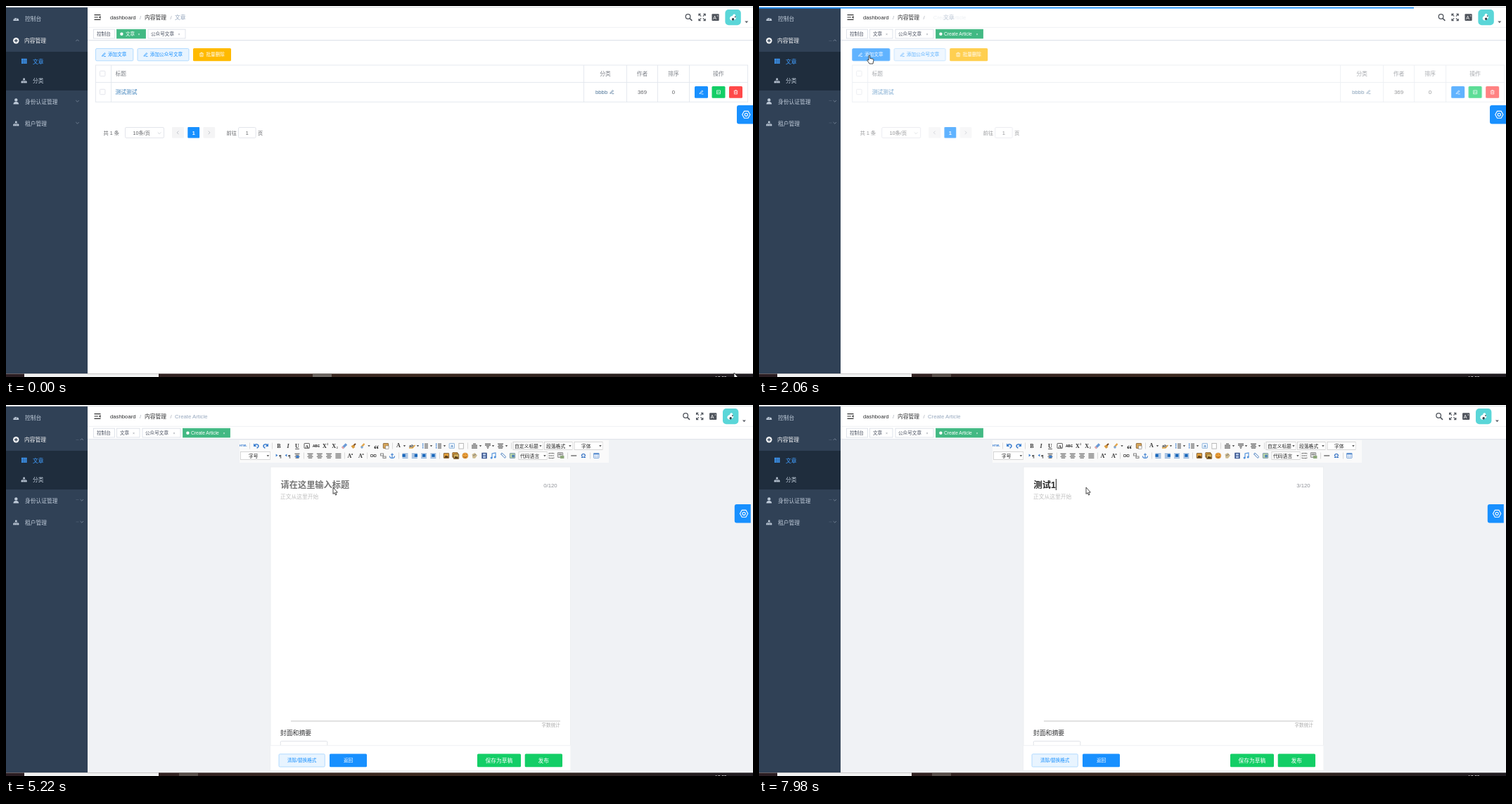
An HTML page that plays this animation: 1062 by 527 pixels, repeating every 8000 ms.

```html
<!DOCTYPE html>
<html lang="zh-CN">
<head>
<meta charset="utf-8">
<title>文章管理</title>
<style>
html, body { margin: 0; width: 100%; height: 100%; overflow: hidden; background: #fff; }
svg { display: block; width: 1062px; height: 527px; font-family: "Liberation Sans", "Noto Sans CJK SC", "Noto Sans CJK", sans-serif; }
text { white-space: pre; }
</style>
</head>
<body>
<svg id="stage" viewBox="0 0 1062 527"></svg>
<script>
const BLUE = '#1890ff', GREEN = '#13ce66', LOOP = 8000;
const LEAVE = 2006, ENTER = 2330, READY = 2550, FOCUS = 3600, COMPOSE = 5860, COMMIT = 6640, DIGIT = 7640;

// Drawing helpers; text is placed by its vertical centre.
const rect = (x, y, w, h, fill, more = '') => `<rect x="${x}" y="${y}" width="${w}" height="${h}" fill="${fill}" ${more}/>`;
const box = (x, y, w, h, fill, stroke, r = 1.5) => rect(x + .5, y + .5, w - 1, h - 1, fill, `stroke="${stroke}" stroke-width=".8" rx="${r}"`);
const text = (x, y, s, size = 7.75, fill = '#606266', more = '') =>
  `<text x="${x}" y="${y + size * .37}" font-size="${size}" fill="${fill}" ${more}>${s}</text>`;
const mid = (x, y, s, size, fill, more = '') => text(x, y, s, size, fill, 'text-anchor="middle" ' + more);
const line = (d, stroke, w = 1, more = '') => `<path d="${d}" fill="none" stroke="${stroke}" stroke-width="${w}" ${more}/>`;
const shape = (d, fill) => `<path d="${d}" fill="${fill}"/>`;
const dot = (x, y, r, fill, more = '') => `<circle cx="${x}" cy="${y}" r="${r}" fill="${fill}" ${more}/>`;
const at = (x, y, s) => `<g transform="translate(${x} ${y})">${s}</g>`;
const group = (id, s) => `<g id="${id}">${s}</g>`;
const chevron = (x, y, up, c = '#8795a8') => line(`M${x - 2.2} ${y + (up ? 1 : -1)}l2.2 ${up ? -2.2 : 2.2}l2.2 ${up ? 2.2 : -2.2}`, c, .7);

const pencil = (x, y, c) => at(x, y, line('M-2.2 1.4L1.2-2.4L2.3-1.4L-1 2L-2.5 2.3ZM0 2.6H3', c, .75));
const trash = (x, y, c) => at(x, y, line('M-2.8-1.7H2.8M-1-1.9V-2.8H1V-1.9M-2.1-1.5V2.7H2.1V-1.5M-.7-.2V1.6M.7-.2V1.6', c, .7));
const picture = (x, y, c) => at(x, y, line('M-2.5-2.5H2.5V2.5H-2.5ZM-2.3 1.6L-.6 0L.6 1L2.3-.4M-1.2-1.2H0', c, .65));
const tree = (x, y, c) => at(x, y, rect(-1.2, -3.4, 2.4, 2.4, c) + [-4, -1.2, 1.6].map(i => rect(i, 1, 2.4, 2.4, c)).join('') + line('M-2.8 1V0H2.8V1M0-1V1', c, .6));

function sidebar() {
  const c = '#bfcbd9';
  return rect(0, 2, 116, 520, '#304156') + rect(0, 65, 116, 55, '#1f2d3d') +
    at(14.3, 18, shape('M-4 3A4 4 0 1 1 4 3Z', c) + line('M0 1.8L1.6-1.4M-2.6 .6h1M-1.8-1.6l.6.6', '#304156', .8)) +
    text(27, 18, '控制台', 7.75, c) +
    dot(14.3, 49.3, 4.2, '#fff') + line('M14.3 46.8v5M11.8 49.3h5', '#304156', 1.3) +
    text(26, 49, '内容管理', 7.75, '#f4f4f5', 'font-weight="500"') +
    rect(22, 74.8, 7.6, 7, '#409eff') + line('M22 77.2h7.6M22 79.5h7.6M24.6 75v7M27.1 75v7', '#1f2d3d', .4) +
    text(38, 79, '文章', 7.75, '#409eff') +
    tree(25.6, 106, c) + text(38, 106, '分类', 7.75, c) +
    dot(14.3, 133.4, 2.2, c) + shape('M10.4 139.4c0-4.6 7.8-4.6 7.8 0Z', c) + text(27, 136, '身份认证管理', 7.75, c) +
    tree(14.3, 167, c) + text(27, 167, '租户管理', 7.75, c) +
    group('arrows', chevron(101.5, 49, true) + chevron(101.5, 135, false) + chevron(101.5, 166, false)) +
    group('remnant', line('M99.5 49.5h4M99.5 134.5h4M99.5 166h4', '#56657a', .6));
}

function tab(x, w, label, active, tx, close) {
  return box(x, 32.7, w, 13.8, active ? '#42b983' : '#fff', active ? '#42b983' : '#d8dce5', 0) +
    (active ? dot(x + 7.4, 39.8, 2.2, '#fff') : '') +
    text(tx, 39.7, label, 6.64, active ? '#fff' : '#495060') +
    (close ? mid(close, 39.7, '×', 5.2, active ? '#fff' : '#8a9099') : '');
}

function header() {
  const ink = '#4f545c';
  return rect(116, 2, 946, 46.5, '#fff') + line('M116 30.4H1062', '#eceef2', .8) + line('M116 48.8H1062', '#d8dce5', 1) +
    line('M125.5 12.6h9M125.5 16h5.4M125.5 19.4h9', '#333', 1.1) + shape('M134.5 14v4l-2.6-2Z', '#333') +
    text(148, 16, 'dashboard', 7.75, '#303133') + text(190, 16, '/', 7.75, '#a4a9b3') +
    text(197, 16, '内容管理', 7.75, '#303133') + text(233.5, 16, '/', 7.75, '#a4a9b3') +
    group('crumbOld', text(240, 16, '文章', 7.75, '#97a8be')) +
    group('crumbNew', text(240, 16, 'Create Article', 7.75, '#97a8be')) +
    tab(124, 31, '控制台', false, 129) +
    group('tabsOld', tab(157, 42, '文章', true, 170, 189) + tab(201.5, 54, '公众号文章', false, 206, 246)) +
    group('tabsNew', tab(157, 33.5, '文章', false, 162, 181.5) + tab(193.5, 55, '公众号文章', false, 198, 239) + tab(251, 68, 'Create Article', true, 263, 310)) +
    group('tools',
      dot(969.6, 15, 3.3, 'none', `stroke="${ink}" stroke-width="1.3"`) + line('M972 17.5l3.4 3.4', ink, 1.6) +
      line('M985 14V11.3H987.7M991.5 11.3H994.2V14M994.2 18V20.7H991.5M987.7 20.7H985V18M985.5 11.8l2.8 2.8M993.7 11.8l-2.8 2.8M985.5 20.2l2.8-2.8M993.7 20.2l-2.8-2.8', ink, 1.2) +
      rect(1003.5, 11.2, 10.2, 9.8, ink, 'rx="1"') + mid(1007.5, 16.4, 'A', 7, '#fff') + mid(1011.8, 14, 'x', 3.8, '#fff') +
      rect(1022.4, 5, 22.4, 22.2, '#5ad6d8', 'rx="5"') +
      group('avatar', '<ellipse rx="4.6" ry="3.2" fill="#fff"/>' + dot(2.8, -2.6, 2, '#fff') + dot(-.5, 1.8, 1.7, '#2e3f48') + dot(3.6, -.3, .9, '#2e3f48')) +
      shape('M1050.3 21.4h5l-2.5 2.8Z', '#5a5e66'));
}

function button(x, w, label, tx, ix, filled) {
  const c = filled ? '#fff' : BLUE;
  return box(x, 60, w, 18.3, filled ? BLUE : '#e8f4ff', filled ? BLUE : '#a3d3ff') + pencil(ix, 69, c) + text(tx, 69, label, 6.64, c);
}

function listPage() {
  const grey = '#909399', cols = [[852, '分类'], [904.5, '作者'], [949, '排序'], [1013, '操作']];
  const ops = [[979, BLUE, pencil], [1003.5, GREEN, picture], [1028, '#ff4949', trash]];
  return group('add', button(127, 54.3, '添加文章', 145, 139, false)) + group('addOn', button(127, 54.3, '添加文章', 145, 139, true)) +
    group('pub', button(186.5, 74, '添加公众号文章', 204.8, 198.5, false)) + group('pubOn', button(186.5, 74, '添加公众号文章', 204.8, 198.5, true)) +
    rect(266, 60, 54, 18.3, '#ffba00', 'rx="1.5"') + trash(278, 69, '#fff') + text(284.5, 69, '批量删除', 6.64, '#fff') +
    line('M127.5 84V136.5M149.5 84V136.5M821.5 84V136.5M882.5 84V136.5M926.5 84V136.5M971.5 84V136.5M1054.5 84V136.5M127 84H1055M127 108.5H1055M127 136.3H1055', '#e2e7ee', .9) +
    [96, 122].map(y => box(133, y - 4.2, 8.4, 8.4, '#fff', '#dcdfe6', 1)).join('') +
    text(155.5, 96, '标题', 7.75, '#7d8188') + cols.map(([x, s]) => mid(x, 96, s, 7.75, '#7d8188')).join('') +
    text(155.5, 122, '测试测试', 7.75, '#337ab7') + text(838, 122, 'bbbb', 7.75, '#4c7397') + pencil(861.3, 122, '#4c7397') +
    mid(904.5, 122, '369', 7.75) + mid(949, 122, '0', 7.75) +
    ops.map(([x, c, icon]) => rect(x, 114, 19, 16.8, c, 'rx="1.5"') + icon(x + 9.5, 122.4, '#fff')).join('') +
    text(138.5, 180, '共 1 条', 7.2) + box(169, 172, 56, 15.8, '#fff', '#dcdfe6') + mid(192.7, 180, '10条/页', 7.2) + chevron(218, 180.5, false, '#c0c4cc') +
    rect(236, 172, 17, 15.6, '#f4f4f5', 'rx="1"') + line('M245.4 177.6l-2.2 2.3l2.2 2.3', '#b4b8c0', .8) +
    rect(258.3, 172, 16.8, 15.6, BLUE, 'rx="1"') + mid(266.7, 180, '1', 7.2, '#fff', 'font-weight="bold"') +
    rect(280.4, 172, 16.8, 15.6, '#f4f4f5', 'rx="1"') + line('M287.7 177.6l2.2 2.3l-2.2 2.3', '#b4b8c0', .8) +
    text(313.5, 180, '前往', 7.2) + box(330, 172, 25.6, 15.8, '#fff', '#dcdfe6') + mid(342.8, 180, '1', 7.2) + text(358, 180, '页', 7.2);
}

function toolbar() {
  const ink = '#333', steel = '#3d7fd0', serif = 'font-family="Liberation Serif, serif" font-weight="bold"';
  const caret = (x, y = 58) => shape(`M${x - 1.7} ${y - .7}h3.4l-1.7 2Z`, ink);
  const letter = (x, y, s, size = 8, more = '') => mid(x, y, s, size, ink, serif + more);
  const bars = (x, y, ws, c = ink, dx = 0) => ws.map((w, i) => rect(x - w / 2 + dx, y - 3.3 + i * 2, w, 1, c)).join('');
  const seps = (y, xs) => xs.map(x => rect(x, y - 4.5, .7, 9, '#ccc')).join('');
  const select = (x, y, w, s, tx) => box(x, y - 6, w, 12, '#fff', '#ccc', 0) + text(tx, y, s, 6.8, '#222') + rect(x + w - 7, y - 5, 6.2, 10, '#fff') + caret(x + w - 3.6, y);
  const frame = (x, y, fill, c = '#777') => box(x - 4.2, y - 3.9, 8.4, 7.8, fill, c, .5);
  const undo = s => `<g transform="scale(${s} 1)">` + line('M-2.5-1C0-3.5 4-1.5 2.6 1.6L.6 3.4', steel, 1.5) + shape('M-4-3.4V1H.4Z', steel) + '</g>';
  const pic = (x, y, c) => frame(x, y, c, '#6a4b23') + shape(`M${x - 3} ${y + 2.8}l2.3-3.4l1.8 1.7l1-1l1 2.7Z`, '#4c3213');
  const wrap = (x, dx) => bars(x, 72, [8, 8, 8, 8], '#5d8fca') + rect(x - 2 + dx, 69.8, 4.2, 4, '#1767bb');
  return rect(332, 49.5, 525, 32.5, '#fafafa') +
    mid(337.2, 58, 'HTML', 4, steel, 'font-weight="bold"') + at(356, 58, undo(1)) + at(369, 58, undo(-1)) +
    letter(388, 58, 'B') + letter(401, 58, 'I', 8, ' font-style="italic"') + letter(414, 58, 'U', 8, ' text-decoration="underline"') +
    frame(427.7, 58, '#fff', ink) + letter(427.7, 58, 'A', 7) + mid(441, 58, 'ABC', 4.6, ink, 'font-weight="bold" text-decoration="line-through"') +
    letter(453, 58.5, 'X') + letter(457.3, 55.4, '2', 4) + letter(466.2, 58, 'X') + letter(470.8, 61, '2', 4) +
    line('M478.5 61l5.5-5.5', '#6b9bd6', 3.4) + line('M478 61.4l1.8-1.8', '#e9a5a5', 3) +
    line('M494 58l3-3', '#7a4a20', 2) + shape('M490.5 58.5l3-2l3 3l-3 2.6Z', '#d99b3e') +
    line('M505 60l4.5-5', '#e3a54a', 2.5) + dot(506, 60, 1.7, '#7aa6d8') + caret(516) +
    letter(526.5, 61.2, '“', 15) + frame(540, 58, '#d9a85c', '#7b5525') + rect(539.5, 58, 4.5, 4.3, '#fff', 'stroke="#666" stroke-width=".5"') +
    letter(558, 57.5, 'A') + caret(566.5) + mid(576.5, 57.5, 'ab', 6, ink, 'font-weight="bold"') + line('M573 61h5l3.6-4', '#e0a23d', 1.3) + caret(585.5) +
    [[596, 604.5], [615, 623.5]].map(([x, c]) => bars(x, 58, [5, 5, 5, 5], '#555', 1.5) + [0, 1, 2].map(i => dot(x - 3.3, 55.5 + i * 2.6, .9, steel)).join('') + caret(c)).join('') +
    frame(633.8, 58, '#eef5fd', '#79a7d7') + mid(633.8, 57.6, 'a', 6, '#286bb0') + box(643.4, 54, 7.4, 8.6, '#fff', '#aaa', 0) +
    [[666, 674.5], [685, 692.5], [703, 711.5]].map(([x, c], i) => bars(x, 58, [[4, 8, 8, 8], [8, 8, 4, 2], [8, 6, 8, 6]][i], '#444') + caret(c)).join('') +
    seps(58, [346, 378, 549, 656, 718]) + select(720.5, 58, 43, '自定义标题', 723) + select(765, 58, 40.5, '段落格式', 768) + select(807.5, 58, 41, '字体', 818) +
    select(333, 72, 43, '字号', 345) +
    [[388, 1], [401, -1]].map(([x, d]) => letter(x + 1.8, 72, '¶', 7) + shape(`M${x - 3 - d * 1.4} 69.5v4l${d * 2.8}-2Z`.replace(/v4l(-?[\d.]+)-2/, 'v4l$1-2'), steel)).join('') +
    bars(414, 72, [7, 5, 7, 5], '#555') + rect(412.5, 72, 4, 3, steel) +
    [-1, 0, 1, 0].map((d, i) => bars(432.5 + i * 13.3, 72, [8, i === 3 ? 8 : 5.5, 8, i === 3 ? 8 : 5.5], '#555')).join('') +
    letter(488.5, 72.5, 'A') + letter(492, 69.4, 'a', 5) + letter(504, 72.5, 'A') + letter(507.5, 69.4, 'a', 5) +
    line('M518.5 70.5h3v3h-3ZM523 70.5h3v3h-3ZM521 72h3', '#666', 1) + line('M532.5 69h4v3h-4ZM536 73h4v2.5h-4Z', '#888', 1.1) +
    line('M549 68.5v7M545.5 72.5c0 4 7 4 7 0M547 70.3h4', steel, 1.1) +
    [-2, 2, 0, 0].map((d, i) => wrap(567.5 + i * 13.3, d)).join('') +
    pic(626, 72, '#e4a13d') + pic(638.5, 71, '#e4a13d') + pic(640, 73, '#d3b15c') +
    dot(652.8, 72, 4, '#f0a33b', 'stroke="#b86e1c" stroke-width=".5"') + line('M650.5 73c1 1.8 3.6 1.8 4.6 0M651 70.6h.8M653.8 70.6h.8', '#6b3e0c', .8) +
    shape('M662.5 70l4-2l3.5 3.5l-3 4.3h-3.5Z', '#cdbb91') + line('M664 72l4-2', '#777', 1) +
    rect(676.3, 67.8, 7.4, 8.4, '#34508c') + rect(678, 69, 4, 2.6, '#b7cbe8') + rect(678, 72.6, 4, 2.6, '#b7cbe8') +
    line('M691 75v-6l5-1v6', '#4d8fdb', 1.1) + dot(690.2, 75, 1.5, '#4d8fdb') + dot(695.2, 74, 1.5, '#4d8fdb') +
    line('M704 70l4 4.5c2 1.5 3-.5 2-1.7l-4-4c-1.6-1.2-3 .5-1.8 2', '#4a7fc0', 1) +
    frame(720, 72, '#b9d5a7', '#6d8aa8') + dot(721, 72.6, 2, '#4d80b8') + select(728.5, 72, 41, '代码语言', 731) +
    line('M772 69.5v-1h7v1M772 74.5v1h7v-1M771.5 72h8', '#555', 1, 'stroke-dasharray="2 .6"') +
    frame(788, 71, '#ddd') + rect(788, 72, 5.4, 4, '#8da77a') + line('M785.5 70h5', '#555', 1) +
    rect(803.2, 71.5, 8, 1, ink) + mid(821, 72, 'Ω', 8.5, '#2c6cc0', 'font-weight="bold"') +
    frame(839.3, 72, '#fff', '#5b8fd0') + rect(835.4, 68.4, 7.8, 2, '#5b8fd0') + line('M835.5 73h7.6M838 70v6M840.7 70v6', '#8fb4e3', .6) +
    seps(72, [423, 481, 513, 558, 616, 798, 830]);
}

function editorPage() {
  const green = (x, w, s) => rect(x, 495.5, w, 18.8, GREEN, 'rx="1.5"') + mid(x + w / 2, 505, s, 7.75, '#fff', 'font-weight="500"');
  return rect(116, 49.3, 946, 472.7, '#f0f2f5') + group('bar', toolbar()) +
    group('card', box(375.5, 87.5, 427.5, 432, '#fff', '#e9ebee', 0) +
      line('M405 449H788', '#c4c4c4', 1) + text(788, 455, '字数统计', 6.64, '#aaa', 'text-anchor="end"') +
      text(389.8, 466, '封面和摘要', 8.9, '#303133') + box(389.8, 477, 67.5, 20, '#fff', '#d9dce2') +
      rect(376, 483.5, 426.5, 35.5, '#fff') + line('M376 483.7H802.5', '#ebedf0', .8) +
      box(387.5, 495.3, 66.3, 19.2, '#e8f4ff', '#a3d3ff') + mid(420.7, 505, '清除/替换格式', 6.64, BLUE) +
      rect(460, 495.5, 53, 18.8, BLUE, 'rx="1.5"') + mid(486.5, 505, '返回', 6.64, '#fff') +
      green(670, 62, '保存为草稿') + green(737.7, 53.3, '发布') +
      '<text id="title" x="390.6" y="117.5" font-size="12.2" font-weight="bold"></text>' +
      text(390, 130, '正文从这里开始', 7.75, '#bfbfbf') +
      '<text id="count" x="783.6" y="117" font-size="7.75" fill="#909399" text-anchor="end"></text>' +
      group('popup', box(391, 122, 120, 24, '#fff', '#c8c8c8', 0) + text(397, 134, '1 测试   2 侧视   3 测', 7.75, '#333')) +
      group('underline', rect(0, 118.8, 1, .8, '#222')) + rect(0, 105, 1, 16, '#222', 'id="caret"'));
}

const hexagon = 'M-5.6 0L-2.8-4.9H2.8L5.6 0L2.8 4.9H-2.8Z';
document.getElementById('stage').innerHTML =
  '<defs><linearGradient id="task"><stop stop-color="#2a1d22"/><stop offset=".55" stop-color="#3d2a20"/><stop offset="1" stop-color="#1f1b20"/></linearGradient></defs>' +
  rect(0, 0, 1062, 527, '#fff') + group('list', listPage()) + group('editor', editorPage()) + header() + sidebar() +
  group('settings', shape('M1062 141H1042a3 3 0 0 0-3 3v20.5a3 3 0 0 0 3 3H1062Z', BLUE) + at(1052.3, 154.3, line(hexagon, '#fff', 1.1) + dot(0, 0, 2.1, 'none', 'stroke="#fff" stroke-width="1.1"'))) +
  rect(0, 0, 1062, 1.2, '#fff') + rect(0, 1.2, 1062, .9, '#d3d6da') + rect(0, 1.8, 0, 1.7, BLUE, 'id="progress"') +
  rect(0, 522.3, 1062, 4.7, 'url(#task)') + rect(26, 522.3, 191, 4.7, '#f1f2f2') + rect(0, 522.3, 27, 4.7, '#6d6762', 'id="task-on"') +
  text(1008, 528.4, '17:22', 6.6, '#fff') +
  group('arrow', '<path d="M0 0V9.4L2.1 7.6L3.5 11L5 10.3L3.6 7.1H6.3Z" fill="#fff" stroke="#111" stroke-width=".75"/>') +
  group('hand', '<path d="M-1 1C-1-.3.8-.3.8 1V4.4L5 5.3C6 5.6 6 6.4 5.8 7.6L5 12H0L-3.2 7.2C-3 6-1.8 6.2-1 7.2Z" fill="#fff" stroke="#111" stroke-width=".75"/>');

const el = {};
document.querySelectorAll('[id]').forEach(e => el[e.id] = e);
const show = (id, on) => el[id].setAttribute('display', on ? 'inline' : 'none');
const set = (id, attrs) => Object.entries(attrs).forEach(([k, v]) => el[id].setAttribute(k, v));
const move = (id, x, y = 0) => set(id, { transform: `translate(${x} ${y})` });
const ramp = (t, from, span) => Math.min(1, Math.max(0, (t - from) / span));
const ease = p => 1 - (1 - p) ** 2;
const smooth = p => p * p * (3 - 2 * p);
const within = (t, a, b) => t >= a && t < b;

// Pointer stops: time, x, y
const stops = [[0, 1035, 521], [220, 880, 430], [500, 420, 235], [780, 182, 126], [900, 178, 118], [1220, 204, 77], [1390, 192, 71],
  [1460, 180, 71], [1600, 157, 70], [2480, 157, 70], [2560, 161, 72], [2640, 161, 72], [2950, 310, 108], [3300, 455, 126], [3560, 465, 117]];
function pointer(t) {
  const i = stops.findIndex(s => s[0] > t);
  if (i < 0) return stops[stops.length - 1].slice(1);
  const [a, b] = [stops[i - 1], stops[i]], p = smooth((t - a[0]) / (b[0] - a[0]));
  return [a[1] + (b[1] - a[1]) * p, a[2] + (b[2] - a[2]) * p];
}

function typing(t) {
  const composing = within(t, COMPOSE, COMMIT), pinyin = "ce'shi".slice(0, 1 + Math.floor((t - COMPOSE) / 95));
  const typed = t >= DIGIT ? '测试1' : t >= COMMIT ? '测试' : composing ? pinyin : '';
  el.title.textContent = typed || '请在这里输入标题';
  set('title', { fill: typed ? '#222' : '#757575' });
  el.count.textContent = t < FOCUS ? '' : (t >= DIGIT ? 3 : t >= COMMIT ? 2 : 0) + '/120';
  const width = typed ? el.title.getComputedTextLength() : 0;
  const since = t - (t >= DIGIT ? DIGIT : t >= COMMIT ? COMMIT : FOCUS);
  set('caret', { x: 390.7 + width });
  show('caret', t >= FOCUS && (composing || Math.floor(since / 530) % 2 === 0));
  show('popup', composing);
  show('underline', composing);
  set('underline', { transform: `translate(390.6 0) scale(${width || 1} 1)` });
}

function draw(t) {
  const routed = t >= LEAVE, ready = t >= READY, out = ease(ramp(t, LEAVE, 324)), enter = ease(ramp(t, ENTER, 150));
  show('list', t < ENTER);
  set('list', { opacity: 1 - out });
  move('list', 16.6 * out);
  show('editor', t >= ENTER);
  set('editor', { opacity: enter });
  move('card', ready ? 0 : 1.7 - 16.6 * (1 - enter));
  show('bar', ready);

  const pubHover = within(t, 1210, 1500), addHover = t >= 1500;
  show('pub', !pubHover); show('pubOn', pubHover);
  show('add', !addHover); show('addOn', addHover);
  show('tabsOld', !routed); show('tabsNew', routed);
  set('crumbOld', { opacity: 1 - ramp(t, LEAVE, 130) });
  move('crumbOld', routed ? 22 : 0);
  set('crumbNew', { opacity: ramp(t, LEAVE + 20, 200) });
  move('crumbNew', 11 * (1 - ease(ramp(t, LEAVE, 350))));
  move('arrows', routed ? 6.3 : 0);
  show('remnant', routed);
  move('tools', ready ? -3.4 : 0);
  move('settings', ready ? -3.2 : 0);

  set('progress', { width: t < 1820 ? 0 : 931 * ease(ramp(t, 1820, 240)) + 131 * ramp(t, 2080, 200), opacity: 1 - ramp(t, 2300, 160) });
  set('task-on', { x: t < 1820 ? 436 : 246, opacity: t < 1820 ? 1 : .65 });
  const w = t / 1000 * Math.PI * 2;
  set('avatar', { transform: `translate(${1033.4 + Math.sin(w * 1.25)} ${16 + Math.cos(w * 2.5)}) rotate(${-20 + 35 * Math.sin(w * 1.25)})` });

  const [x, y] = pointer(t), hand = within(t, 790, 960) || within(t, 1230, 1420) || within(t, 1510, 2500);
  show('arrow', !hand); show('hand', hand);
  move('arrow', x, y); move('hand', x, y);
  typing(t);
}

const start = performance.now();
function tick() {
  draw((performance.now() - start) % LOOP);
  requestAnimationFrame(tick);
}
draw(0);
requestAnimationFrame(tick);
</script>
</body>
</html>
```
